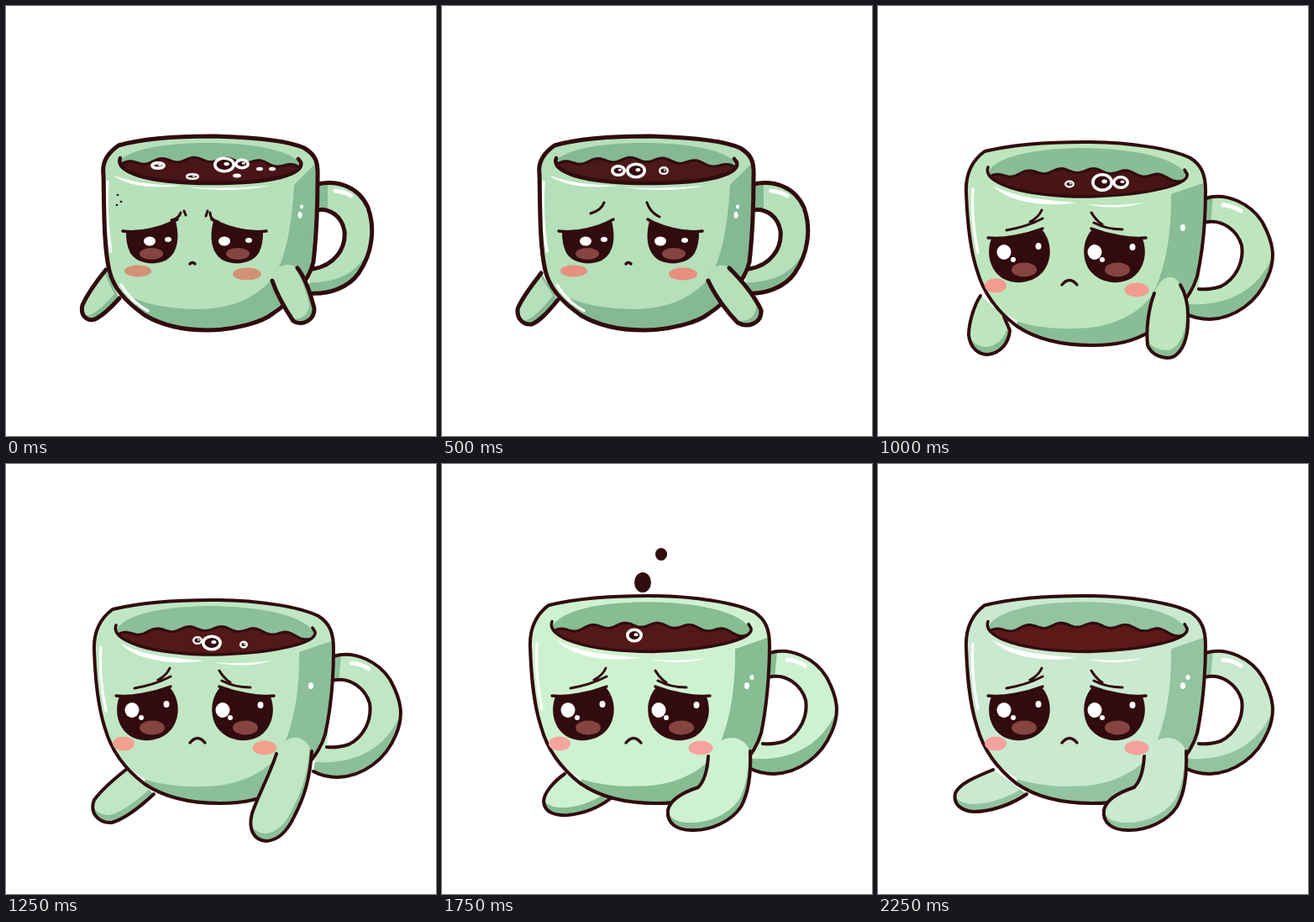
An HTML page for the animation above (2500 ms loop, 512x512 px).

```html
<!DOCTYPE html>
<html lang="en">
<head>
<meta charset="utf-8">
<title>Sad cup</title>
<style>
html, body { margin: 0; width: 100%; height: 100%; overflow: hidden; background: #fff; }
svg { display: block; width: 100%; height: 100%; }
</style>
</head>
<body>
<svg id="stage" viewBox="0 0 512 512" stroke-linecap="round" stroke-linejoin="round"></svg>
<script>
const HOLD = 250;
const INK = '#310b0e';

// Three drawings of the cup; poses below vary arms, bubbles and colours.
const squat = {
  line: 5,
  body: 'M116 200C114 186 121 175 134 166C165 157 205 155 246 155C290 156 335 160 355 169C368 177 372 184 371 205C371 235 370 270 366 305C360 330 335 355 318 366C305 377 270 386 240 386C210 386 185 380 165 368C140 350 128 335 123 315C116 285 117 240 116 200Z',
  inside: 'M134 186C148 168 200 163 240 163C288 163 335 170 351 187C352 200 320 211 245 211C165 211 132 198 134 186Z',
  lip: 'M136 181C130 197 165 211 245 211C320 211 355 200 351 186L348 182',
  shade: 'M343 213C341 250 336 290 322 318C300 350 262 362 225 361C195 360 175 357 152 348L170 400L400 400L400 185L366 190Z',
  handle: 'M371 212C395 207 420 215 431 240C440 265 436 295 420 318C408 335 385 344 360 342',
  hole: 'M370 243C385 240 400 250 403 268C405 290 390 309 366 313',
  grip: 'M365 200H383V246H365ZM440 270C425 318 400 329 355 330V350H440Z',
  gloss: 'M392 220Q403 221 411 226',
  shine: 'M127 201C150 211 180 213 208 214C180 217 145 216 127 201ZM216 216Q265 218 314 214Q268 223 216 216Z',
  streak: 'M121 209C119 240 121 268 125 292M137 332Q149 352 169 363',
  coffee: [243, 183, 8, 0],
  eye: 'M143 270C160 268 185 262 202 256C207 275 205 295 190 303C175 310 155 306 148 294C144 286 143 278 143 270Z',
  lid: 'M139 268C160 271 187 264 204 254',
  shift: [0, 0], mirror: 449,
  iris: [[173, 295, 14, 7], [276, 295, 14, 7]],
  glints: [[171, 280, 7, 5.5], [193, 278, 4, 3], [260, 280, 7, 5.5], [289, 279, 4, 3]],
  cheeks: [[157, 315.5, 16, 7], [287, 319, 17, 7.5]],
  mouth: 'M219 307Q222 304 225 307',
  specks: [[350, 249, 2.5, 4], [352, 239, 2, 2.5]]
};

const roundEye = {
  eye: 'M135 277C155 275 180 271 195 266C208 280 208 305 195 318C180 333 155 332 143 320C131 308 130 290 135 277Z',
  lid: 'M131 276C150 278 175 273 196 265'
};

const lean = {
  ...roundEye,
  line: 4.5,
  body: 'M111 205C112 187 118 174 130 168C160 157 205 154 242 154C290 154 335 162 360 171C373 180 377 192 377 215C377 250 374 290 368 318C360 340 335 360 322 367C300 382 270 391 235 390C200 389 175 378 158 367C135 345 126 325 120 300C113 265 111 235 111 205Z',
  inside: 'M134 187C148 168 200 162 242 162C290 163 340 171 354 188C352 205 315 216 245 216C175 216 132 202 134 187Z',
  lip: 'M135 181C128 200 175 216 245 216C315 216 356 205 354 189L352 184',
  shade: 'M345 212C345 260 337 310 322 338C303 362 270 373 235 373C212 374 190 372 172 370L185 400H400V190L370 195Z',
  handle: 'M376 214C400 207 430 222 445 243C460 265 461 290 450 312C440 335 420 352 395 356C375 358 362 354 352 349',
  hole: 'M376 246C395 240 415 255 421 272C426 295 415 316 398 324C388 327 378 323 368 319',
  grip: 'M365 200H387L382 246H365ZM456 285C440 326 405 343 350 339V362H460Z',
  gloss: 'M396 224Q407 225 415 231',
  shine: 'M157 209C175 214 195 215 214 217C190 221 170 218 157 209ZM222 218Q262 221 300 216Q262 226 222 218Z',
  streak: 'M118 213Q117 235 120 258M139 341Q153 361 174 374',
  coffee: [244, 185, 5, 1],
  shift: [4, -9], mirror: 453,
  iris: [[175, 303, 16, 9], [286, 304, 17, 9]],
  glints: [[150, 280, 9, 9], [160, 290, 3, 3], [197, 276, 3, 4], [257, 281, 8.5, 9], [265, 291, 3, 3], [299, 276, 3, 4]],
  cheeks: [[140, 316, 12, 8], [312, 320, 14, 8]],
  brows: 'M164 250Q181 246 200 237M252 239Q270 250 288 251',
  mouth: 'M217 321Q225 313 232 321',
  specks: [[348, 253, 4, 4], [128, 211, 2, 3]]
};

const tall = {
  ...roundEye,
  line: 4,
  body: 'M105 222C104 200 112 184 127 173C160 165 205 162 245 162C300 162 350 170 372 181C386 190 390 202 390 220C390 255 386 295 380 322C372 350 345 375 325 387C305 399 285 404 255 404C220 404 190 398 165 381C140 362 125 340 118 315C108 285 106 250 105 222Z',
  inside: 'M131 198C142 177 195 169 245 169C305 170 355 180 367 201C365 215 320 226 250 227C180 227 128 213 131 198Z',
  lip: 'M131 192C124 210 170 227 250 227C322 225 371 213 368 200L365 195',
  shade: 'M349 224C350 270 342 315 326 345C305 372 270 384 235 384C205 385 182 381 160 374L180 420H410V205L384 212Z',
  handle: 'M390 229C415 221 445 236 458 258C471 282 474 300 464 323C452 352 425 372 395 373C385 373 375 371 366 366',
  hole: 'M388 258C410 252 428 268 433 285C436 305 426 325 408 334C398 337 390 338 382 337',
  grip: 'M375 215H400L396 260H375ZM470 298C450 343 410 360 360 354V380H475Z',
  gloss: 'M411 237Q423 238 432 244',
  shine: 'M137 214C165 228 195 231 236 234C200 240 155 234 137 214ZM248 236Q285 239 317 234Q285 244 248 236Z',
  streak: 'M113 218C111 245 115 275 119 294M128 341Q143 365 164 376',
  coffee: [250, 196, 9, 1],
  shift: [0, 0], mirror: 450,
  iris: [[174, 314, 15, 8.5], [285, 314, 15, 8.5]],
  glints: [[150, 293, 8.5, 9], [161, 302, 3, 3], [191, 286, 3.5, 4], [258, 293, 8.5, 9], [267, 302, 3, 3], [303, 287, 3.5, 4]],
  cheeks: [[140, 333, 13, 8.5], [308, 338, 14.5, 8.5]],
  brows: 'M153 267Q177 263 196 253M181 257Q191 252 195 243M254 246Q260 256 267 260M257 258Q272 266 291 266',
  mouth: 'M219 332Q228 321 237 332',
  specks: [[363, 264, 3, 4]]
};

const sit = 'M317 348C316 365 312 378 305 385C290 390 272 398 269 412C267 428 280 436 297 436C320 437 345 425 356 408C366 390 368 365 367 342';
const sitCap = 'C358 318 325 322 317 348';
const footOut = 'M137 364C118 372 97 380 92 392C89 406 100 413 114 414C135 414 160 405 177 393';

const poses = [
  { cup: squat, main: '#b7e1ba', dark: '#86bc94', blush: '#d39176', brew: '#4a1518',
    brows: 'M197 255Q206 253 208 246M212 244L214 249M240 244L238 250M243 246Q243 255 253 257',
    left: 'M119 314C110 325 97 343 91 356C88 368 96 376 106 373C116 368 126 358 135 348',
    right: 'M317 327C322 342 334 363 342 375C352 382 368 374 367 360C362 340 355 322 347 312', cap: 'C335 302 316 312 317 327',
    bubbles: [[181, 190, 9, 5], [222, 203, 8, 4], [281, 188, 9, 6.5], [260, 189, 13, 9.5]],
    foam: [[302, 194, 4, 2.2], [317, 194, 4, 2.2], [275, 202, 5, 2.5]],
    dots: [[133, 225], [137, 233], [132, 237]] },
  { cup: squat, main: '#b6e1ba', dark: '#86bb94', blush: '#dd8f7b', brew: '#4b1718',
    brows: 'M183 248Q193 244 197 236M241 238Q245 247 256 252',
    left: 'M118 312C100 325 82 340 76 354C73 366 82 374 93 371C110 365 125 355 136 346',
    right: 'M317 326C330 345 350 362 366 373C380 380 397 372 394 358C385 342 362 322 344 311', cap: 'C332 302 314 312 317 326',
    bubbles: [[195, 194, 7, 5], [244, 193, 12, 9], [270, 194, 8, 6]] },
  { cup: squat, main: '#b5e0b9', dark: '#85b993', blush: '#e69080', brew: '#4c1919',
    brows: 'M177 247Q190 243 193 234M244 234Q248 246 259 251',
    left: 'M118 318C108 332 95 347 90 361C89 374 98 380 107 379C118 374 128 362 138 350',
    right: 'M317 327C325 345 340 365 352 377C364 384 381 378 380 362C372 345 355 325 342 312', cap: 'C332 304 314 312 317 327',
    bubbles: [[210, 196, 9, 7], [231, 196, 12, 9.5], [264, 196, 6, 5]] },
  { cup: lean, main: '#bde6c3', dark: '#88b796', blush: '#eea088', brew: '#441416',
    bubbles: [[202, 195, 10, 7.5], [222, 197, 12, 9.5], [252, 202, 6, 5]] },
  { cup: tall, main: '#bee6bd', dark: '#89bd95', blush: '#f39c92', brew: '#481414',
    left: 'M122 345C114 357 108 378 108 392C110 408 120 415 131 415C147 413 156 400 157 386L150 370',
    right: 'M329 342C322 360 319 385 321 404C326 416 340 421 351 418C363 412 369 395 369 375C370 355 366 342 360 332', cap: 'C352 316 336 322 329 342',
    bubbles: [[228, 212, 6, 4.5], [289, 210, 10, 8], [267, 210, 13, 11]] },
  { cup: tall, main: '#c0e7c3', dark: '#8bbf99', blush: '#f3a08f', brew: '#531818',
    left: 'M144 363C130 374 113 389 105 400C99 415 110 428 126 427C143 422 160 408 176 393',
    right: 'M322 345C314 370 300 395 293 416C288 435 295 448 310 449C325 448 335 437 343 420C355 397 362 375 364 342', cap: 'C355 318 330 322 322 345',
    bubbles: [[228, 210, 6, 5], [245, 213, 12, 9.5], [283, 215, 5, 4.5]] },
  { cup: tall, rise: 5, main: '#c8edca', dark: '#88be95', blush: '#f5a297', brew: '#541717',
    left: 'M140 360C122 370 98 385 88 397C81 412 93 424 108 421C130 414 155 402 174 391',
    right: 'M321 345C314 372 303 395 297 418C291 438 299 451 313 451C330 450 339 436 346 418C357 395 364 375 365 342', cap: 'C355 318 330 322 321 345',
    bubbles: [[229, 206, 10, 8], [262, 208, 5, 4]], drops: [[239, 141, 10, 12], [261, 107.5, 7, 7.5]] },
  { cup: tall, rise: 5, main: '#cef2cf', dark: '#86bd92', blush: '#f7a49f', brew: '#541818',
    left: 'M146 369C133 378 121 392 121 402C122 415 135 419 150 418C170 416 188 408 201 398',
    right: sit, cap: sitCap,
    bubbles: [[229, 204, 10, 8.5]], drops: [[239, 141, 10, 12], [261, 107.5, 7, 7.5]] },
  { cup: tall, rise: 5, main: '#cceed0', dark: '#8cc199', blush: '#f6a29d', brew: '#571919',
    left: footOut, right: sit, cap: sitCap, drops: [[240, 133, 8, 9], [261, 103, 6, 6]] },
  { cup: tall, rise: 5, main: '#cae9d1', dark: '#92c4a0', blush: '#f5a19e', brew: '#5c1918',
    left: footOut, right: sit, cap: sitCap }
];

const path = (d, fill = 'none', stroke = 'none', w = 0, more = '') =>
  `<path d="${d}" fill="${fill}" stroke="${stroke}" stroke-width="${w}" ${more}/>`;
const oval = ([x, y, rx, ry], fill, more = '') =>
  `<ellipse cx="${x}" cy="${y}" rx="${rx}" ry="${ry}" fill="${fill}" ${more}/>`;
const ovals = (list = [], fill) => list.map(o => oval(o, fill)).join('');
const clip = (id, d) => `<clipPath id="${id}"><path d="${d}"/></clipPath>`;
const inClip = (id, art) => `<g clip-path="url(#${id})">${art}</g>`;

function arm(id, d, cap, p) {
  if (!d) return '';
  const shape = d + cap;
  const lift = p.cup === squat ? 'translate(-6 -5)' : 'translate(-2 -9)';
  return clip(id, shape) + path(shape, p.dark) +
    inClip(id, path(shape, p.main, 'none', 0, `transform="${lift}"`)) +
    path(d, 'none', INK, p.cup.line);
}

function handle(p) {
  const c = p.cup, w = c.line;
  return `<g transform="translate(0 ${p.rise ? -4 : 0})">` + clip('grip', c.handle) +
    path(c.handle, p.main) + inClip('grip', path(c.grip, p.dark)) +
    path(c.handle, 'none', INK, w) + path(c.hole, '#fff', INK, w) +
    path(c.gloss, 'none', '#fff', 5) + '</g>';
}

function coffee([cx, top, sag, phase], brew) {
  let d = '';
  for (let x = cx - 125; x <= cx + 125; x += 3) {
    const u = (x - cx) / 110;
    const y = top + sag * u * u + 2.6 * Math.sin(x / 6.2 + phase) + 2 * u;
    d += (d ? 'L' : 'M') + x + ' ' + y.toFixed(1);
  }
  return path(d + 'V240H100Z', brew, INK, 3);
}

function bubble([x, y, rx, ry]) {
  const w = rx > 8 ? 3.6 : 2.4;
  return oval([x, y, rx - w / 2, ry - w / 2], INK, `stroke="#fff" stroke-width="${w}"`) +
    oval([x + rx * .2, y - ry * .1, rx * .25, ry * .22], '#fff');
}

function cup(p) {
  const c = p.cup, k = p.rise ? 247 / 242 : 1;
  return `<g transform="translate(0 ${404 * (1 - k)}) scale(1 ${k})">` +
    clip('body', c.body) + clip('inside', c.inside) + path(c.body, p.main) +
    inClip('body', path(c.shade, p.dark)) + path(c.inside, p.dark) +
    inClip('inside', coffee(c.coffee, p.brew)) +
    path(c.lip, 'none', INK, c.line - .5) + path(c.shine, '#fff') +
    path(c.streak, 'none', '#fff', 3.2) + path(c.body, 'none', INK, c.line) + '</g>';
}

function face(p) {
  const c = p.cup;
  const eye = `<g transform="translate(${c.shift})">` +
    path(c.eye, INK) + path(c.lid, 'none', INK, 3.4) + '</g>';
  return ovals(c.cheeks, p.blush) + eye +
    `<g transform="translate(${c.mirror} 0) scale(-1 1)">${eye}</g>` +
    ovals(c.iris, '#85443f') + ovals(c.glints, '#fff') +
    path(p.brows || c.brows, 'none', INK, 3) + path(c.mouth, 'none', INK, 3.4);
}

function draw(p) {
  const dots = (p.dots || []).map(([x, y]) => [x, y, 1.3, 1.3]);
  const second = p.rise ? [[369, 254, 2.5, 3]] : [];
  return handle(p) + arm('left', p.left, '', p) + cup(p) +
    (p.bubbles || []).map(bubble).join('') + ovals(p.foam, '#fff') +
    ovals([...p.cup.specks, ...second], '#fff') + ovals(dots, INK) +
    arm('right', p.right, p.cap, p) + face(p) + ovals(p.drops, INK);
}

const stage = document.getElementById('stage');
const scenes = poses.map(draw);
const start = performance.now();
let shown = -1;

function update(now) {
  const i = Math.floor(Math.max(0, now - start) / HOLD) % scenes.length;
  if (i !== shown) stage.innerHTML = scenes[shown = i];
  requestAnimationFrame(update);
}
update(start);
</script>
</body>
</html>
```
